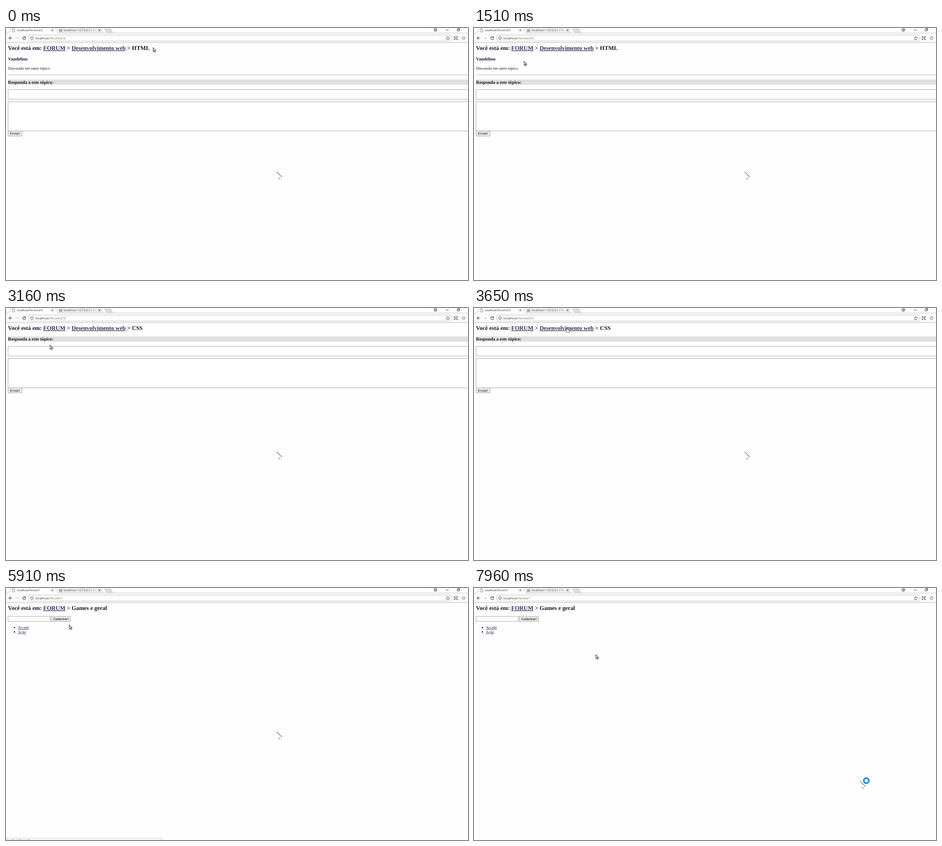
An HTML page that plays this animation: 1008 px wide and 551 px high, repeating every 8 s.

```html
<!DOCTYPE html>
<html lang="pt-BR">
<head>
<meta charset="utf-8">
<title>Forum</title>
<style>
html, body { margin: 0; width: 100%; height: 100%; overflow: hidden; background: #fefefe; }
svg { display: block; width: 1008px; height: 551px; }
text { white-space: pre; fill: #15152a; text-rendering: geometricPrecision; }
.ui { font: 7.05px "Open Sans", "Noto Sans", sans-serif; fill: #333; }
.path { fill: #666; }
.tab { font-size: 6px; fill: #222; }
.h2 { font: bold 12.75px "Liberation Serif", serif; }
.h3 { font: bold 9.9px "Liberation Serif", serif; }
.p { font: 8.5px "Liberation Serif", serif; }
.btn { font: 7.1px "Liberation Sans", sans-serif; }
.bold { font-weight: bold; font-size: 6.8px; fill: #333; }
.a { fill: #352d5c; text-decoration: underline; }
.line { fill: none; stroke: #444; }
.field { fill: #fff; stroke: #a9a9a9; }
.button { fill: #ececec; stroke: #a8a8a8; }

.step, .move { animation: 8s infinite; }
.step { animation-timing-function: step-end; visibility: hidden; }
.move { animation-timing-function: linear; }

#topic { animation-name: topic; }
#dev { animation-name: dev; }
#css { animation-name: css; }
#forum { animation-name: forum; }
#games { animation-name: games; }
#idle { animation-name: idle; }
#busy { animation-name: busy; }
#status { animation-name: status; }
#arrow { animation-name: arrow; }
#hand { animation-name: hand; }
#beam { animation-name: beam; }
#ring { animation-name: ring; }
#pointer { animation-name: pointer; }
#second { animation-name: second; }

@keyframes topic { 0%, 15.5% { visibility: visible } 4.5%, 26%, to { visibility: hidden } }
@keyframes dev { 0%, 15.5%, 36.5%, 57.5%, to { visibility: hidden } 4.5%, 26%, 47.5% { visibility: visible } }
@keyframes css { 0%, 47.5%, to { visibility: hidden } 36.5% { visibility: visible } }
@keyframes forum { 0%, 68%, to { visibility: hidden } 57.5% { visibility: visible } }
@keyframes games { 0% { visibility: hidden } 68%, to { visibility: visible } }
@keyframes idle {
  0%, 4.5%, 15.5%, 26%, 36.5%, 47.5%, 57.5%, 68%, to { visibility: visible }
  3.2%, 14.2%, 24.8%, 35.3%, 46.2%, 55.5%, 66.7% { visibility: hidden }
}
@keyframes busy {
  0%, 4.5%, 15.5%, 26%, 36.5%, 47.5%, 57.5%, 68%, to { visibility: hidden }
  3.2%, 14.2%, 24.8%, 35.3%, 46.2%, 55.5%, 66.7% { visibility: visible }
}
@keyframes status {
  0%, 16.5%, 27%, 38.5%, 75.6%, to { visibility: hidden }
  3%, 24%, 33%, 46.5% { visibility: visible }
}
@keyframes arrow {
  0%, 4.5%, 16.5%, 29.5%, 38%, 48.5%, 58.5%, 69%, to { visibility: visible }
  .875%, 12%, 22%, 32.5%, 42.5%, 53%, 63.8% { visibility: hidden }
}
@keyframes hand {
  0%, 4.5%, 16.5%, 26%, 38%, 48.5%, 58.5%, 69%, to { visibility: hidden }
  .875%, 12%, 22%, 32.5%, 42.5%, 53%, 63.8% { visibility: visible }
}
@keyframes beam { 0%, 29.5%, to { visibility: hidden } 26% { visibility: visible } }
@keyframes ring { 0% { visibility: hidden } 93.6%, to { visibility: visible } }
@keyframes pointer {
  0%, .874% { transform: translate(321px, 43px) }
  .875%, 4% { transform: translate(215px, 43px) }
  9% { transform: translate(67px, 121px) }
  12.5%, 16% { transform: translate(35px, 94px) }
  23%, 26% { transform: translate(215px, 43px) }
  28.1% { transform: translate(234px, 42px) }
  33%, 37% { transform: translate(35px, 103px) }
  43.9%, 48% { transform: translate(203px, 43px) }
  54.2%, 58% { transform: translate(113px, 42px) }
  64.5%, 68.5% { transform: translate(42px, 84px) }
  73.8%, 75.6% { transform: translate(138px, 81px) }
  81.5%, 83.2% { transform: translate(208px, 123px) }
  92.7% { transform: translate(262px, 144px) }
  99.4%, to { transform: translate(266px, 146px) }
}
@keyframes second {
  0%, 83.2% { transform: translate(590px, 314px) }
  92.7% { transform: translate(837px, 420px) }
  93.6%, to { transform: translate(842px, 422px) }
}
</style>
</head>
<body>
<svg viewBox="0 0 1008 551">
  <defs>
    <linearGradient id="fade" x1="0" x2="1">
      <stop offset="0" stop-color="#eee" stop-opacity="0"/>
      <stop offset="1" stop-color="#eee"/>
    </linearGradient>
    <g id="reply">
      <rect x="4" y="62" width="1004" height="11.5" fill="#e0e0e0"/>
      <text class="h3" x="4.5" y="71">Responda a este tópico:</text>
      <rect class="field" x="4.5" y="84" width="1010" height="21"/>
      <rect class="field" x="4.5" y="110.5" width="1010" height="64"/>
      <rect class="button" x="4.5" y="174.5" width="30.5" height="11"/>
      <text class="btn" x="8.5" y="182.5">Enviar!</text>
    </g>
    <g id="create">
      <rect class="field" x="4.5" y="62" width="92" height="11"/>
      <rect class="button" x="98.5" y="62" width="42" height="11"/>
      <text class="btn bold" x="103" y="70">Cadastrar!</text>
    </g>
    <circle id="dot" cx="18.4" r="1.5" fill="#15152a"/>
  </defs>

  <rect width="1008" height="551" fill="#fefefe"/>

  <!-- browser frame -->
  <rect y="11" width="1008" height="21" fill="#fafafa"/>
  <path d="M109 0H205L211 11H114Z" fill="#eee"/>
  <path d="M5 11L11 0M107 0L113 11H1008M205 0L211 11M0 11H5" class="line" style="stroke:#bbb;stroke-width:.8"/>
  <path d="M214 1.5H229L233 10H219Z" fill="#dcdcdc" stroke="#c4c4c4" stroke-width=".6"/>
  <path d="M0 32H1008" stroke="#b8b8b8"/>
  <rect x="49.5" y="15.5" width="921.5" height="13" rx="1" fill="#fff" stroke="#c6c6c6"/>
  <rect x="115.5" y="2.5" width="7" height="6" fill="#aaa"/>
  <text class="ui tab" x="126" y="7.3" style="font-size:6.25px;fill:#444">localhost / 127.0.0.1 / for</text>
  <rect x="184" y="1" width="15" height="9" fill="url(#fade)"/>
  <path d="M98.8 2.8l4.4 4.4m0-4.4l-4.4 4.4M201.8 2.8l4.4 4.4m0-4.4l-4.4 4.4" class="line"/>
  <path d="M13.5 22H6.8M10 18.8L6.8 22L10 25.2" class="line" style="stroke-width:1.1"/>
  <path d="M21 22H27.7M24.5 18.8L27.7 22L24.5 25.2" class="line" style="stroke:#d0d0d0"/>
  <circle cx="56.5" cy="22" r="3.3" class="line" style="stroke-width:.8"/>
  <path d="M56.5 21.5V24M56.5 19.8V20.7" class="line" style="stroke-width:.9"/>
  <path d="M964 18.2l1.1 2.7 2.9.2-2.2 1.9.7 2.8-2.5-1.5-2.5 1.5.7-2.8-2.2-1.9 2.9-.2Z" class="line" style="stroke-width:.8"/>
  <path d="M977.5 20.5V18.5H979.5M983 18.5H985V20.5M985 23.5V25.5H983M979.5 25.5H977.5V23.5" class="line"/>
  <rect x="979.2" y="20.2" width="4" height="3.6" class="line" style="stroke-width:.9"/>
  <circle cx="998.3" cy="22" r="3.2" fill="#ddd" stroke="#a5a5a5" stroke-width="1.3"/>
  <circle cx="937" cy="4" r="3.2" class="line"/>
  <path d="M935 3.5H939M935.5 5.8H938.5M960 4.5H966" class="line"/>
  <path d="M984.5 2.5H988.5V6.5H984.5ZM986 2.5V1H990V5H988.5" class="line"/>

  <g id="idle" class="step">
    <path d="M13.8 1.5H17L19.2 3.7V8.5H13.8ZM17 1.5V3.7H19.2" fill="#fff" stroke="#777" stroke-width=".8"/>
    <path d="M42.2 20.2A3.1 3.1 0 1 0 42.8 22.8" class="line" style="stroke-width:1.2"/>
    <path d="M43.2 18V21.6H39.6Z" fill="#444"/>
  </g>
  <path id="busy" class="step line" d="M37 19.3l5.4 5.4m0-5.4l-5.4 5.4" style="stroke-width:1.1"/>

  <!-- pages -->
  <g id="topic" class="step">
    <text class="ui tab" x="24" y="7.3">localhost/forum/2/2</text>
    <text class="ui" x="64" y="24.6">localhost<tspan class="path">/forum/2/2</tspan></text>
    <text class="h2" x="4.3" y="48">Você está em: <tspan class="a">FORUM</tspan> &gt; <tspan class="a">Desenvolvimento web</tspan> &gt; HTML</text>
    <text class="h3" x="4.5" y="71">Vandelino</text>
    <text class="p" x="4.5" y="91" style="font-size:8.6px">Discussão em outro tópico</text>
    <path d="M4 102.3H1008" stroke="#b5b5b5"/>
    <use href="#reply" y="50.7"/>
  </g>

  <g id="dev" class="step">
    <text class="ui tab" x="24" y="7.3">localhost/forum/2</text>
    <text class="ui" x="64" y="24.6">localhost<tspan class="path">/forum/2</tspan></text>
    <text class="h2" x="4.3" y="48">Você está em: <tspan class="a">FORUM</tspan> &gt; Desenvolvimento web</text>
    <use href="#create"/>
    <use href="#dot" y="86.5"/><use href="#dot" y="96"/><use href="#dot" y="105.5"/>
    <text class="p a" x="25.7" y="89">PHP</text>
    <text class="p a" x="25.7" y="98.7">HTML</text>
    <text class="p a" x="25.7" y="108.3">CSS</text>
  </g>

  <g id="css" class="step">
    <text class="ui tab" x="24" y="7.3">localhost/forum/2/3</text>
    <text class="ui" x="64" y="24.6">localhost<tspan class="path">/forum/2/3</tspan></text>
    <text class="h2" x="4.3" y="48">Você está em: <tspan class="a">FORUM</tspan> &gt; <tspan class="a">Desenvolvimento web</tspan> &gt; CSS</text>
    <use href="#reply"/>
  </g>

  <g id="forum" class="step">
    <text class="ui tab" x="24" y="7.3">localhost/forum</text>
    <text class="ui" x="64" y="24.6">localhost<tspan class="path">/forum</tspan></text>
    <text class="h2" x="4.3" y="48">Você está em: FORUM</text>
    <use href="#create"/>
    <use href="#dot" y="86.5"/><use href="#dot" y="96"/>
    <text class="p a" x="25.7" y="89">Games e geral</text>
    <text class="p a" x="25.7" y="98.7">Desenvolvimento web</text>
  </g>

  <g id="games" class="step">
    <text class="ui tab" x="24" y="7.3">localhost/forum/1</text>
    <text class="ui" x="64" y="24.6">localhost<tspan class="path">/forum/1</tspan></text>
    <text class="h2" x="4.3" y="48">Você está em: <tspan class="a">FORUM</tspan> &gt; Games e geral</text>
    <use href="#create"/>
    <use href="#dot" y="86.5"/><use href="#dot" y="96"/>
    <text class="p a" x="25.7" y="89">Arcade</text>
    <text class="p a" x="25.7" y="98.7">Ação</text>
  </g>

  <g id="status" class="step">
    <path d="M-1 546.5H339.5Q341.5 546.5 341.5 548.5V552H-1Z" fill="#f6f6f6" stroke="#d4d4d4" stroke-width=".8"/>
    <text class="ui tab" x="2" y="554.3">localhost/forum/2</text>
  </g>

  <!-- pointers -->
  <g id="pointer" class="move">
    <path id="arrow" class="step" d="M0 0V8.6L2 6.9L3.4 10L4.9 9.3L3.5 6.3H6.2Z" fill="#eee" stroke="#4a4a52" stroke-width="1.1"/>
    <path id="hand" class="step" d="M-.8 .8Q0 -.4 .8 .8V4L4 4.8Q5 5 5 6.2L4.2 10.5H-.2L-3 6.4Q-2.6 5.2 -.8 6.6Z" fill="#fff" stroke="#45405c" stroke-width=".9"/>
    <path id="beam" class="step line" d="M-2 -4.5H2M0 -4.5V4.5M-2 4.5H2" style="stroke:#222;stroke-width:.9"/>
  </g>
  <g id="second" class="move">
    <path d="M.3 .3L12 12" stroke="#111"/>
    <path d="M4 13.7L5.2 15.2M5.7 15.8L6.5 17.6M6.2 12.9L7.2 14.5M7.7 15.2L8.6 17.2" stroke="#222" stroke-width=".9" stroke-dasharray="1.2 .5"/>
    <circle id="ring" class="step" cx="14" cy="-.7" r="5.5" fill="#fff" stroke="#2b95e3" stroke-width="4"/>
  </g>
</svg>
</body>
</html>
```
